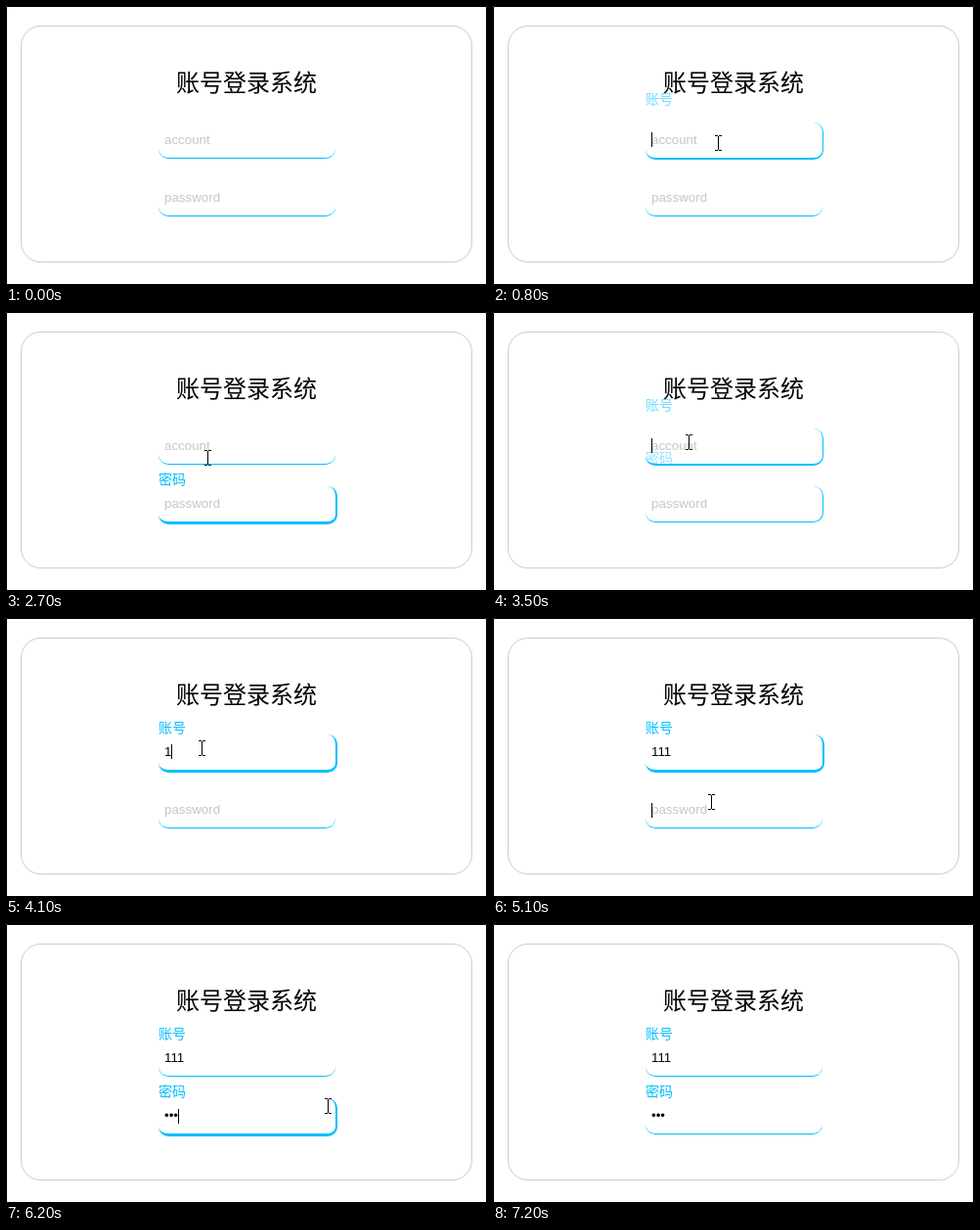
Recreate the animation shown at these times as an HTML page. Size 492 px wide and 284 px high, loop 7.6 s.

```html
<!DOCTYPE html>
<html lang="zh">
<head>
<meta charset="utf-8">
<style>
  html, body { margin: 0; width: 100%; height: 100%; overflow: hidden; background: #fff; }
  #stage { position: relative; width: 492px; height: 284px; overflow: hidden; }
  .field {
    position: absolute; left: 156px; width: 181px; height: 36px;
    border: 0 solid #00bfff; border-radius: 10px;
  }
  svg { position: absolute; left: 0; top: 0; }
  .cjk { font-family: "Noto Sans CJK SC", "Noto Sans CJK", sans-serif; }
  .title { font-size: 24px; }
  .label { font-size: 14px; fill: #00bfff; }
  .input { font: 13.333px "Liberation Sans", Arial, sans-serif; }
  .hint { fill: #c6c6c6; }
</style>
</head>
<body>
<div id="stage">
  <svg id="art" width="492" height="284" viewBox="0 0 492 284">
    <path d="M.5 284V.5H491.5V284" fill="none" stroke="#000"/>
    <rect x="15.5" y="20.5" width="461" height="241" rx="20" fill="none" stroke="#ccc"/>
    <text class="cjk title" x="246" y="87" text-anchor="middle">账号登录系统</text>
    <g id="fields"></g>
    <rect id="caret" width="1" height="15"/>
    <g id="cursor">
      <path id="beam" d="M-3-7.5H0M1-7.5H4M.5-7V7M-3 7.5H0M1 7.5H4" fill="none" stroke="#000"/>
      <path id="arrow" d="M.5.5V16.5L4.3 13 7 19 9.3 18 6.7 12H11.5Z" fill="#fff" stroke="#000"/>
    </g>
  </svg>
</div>
<script>
const LOOP = 7600, STEP = 100, FADE = 290, BLINK = 480, SLIDE = 39;
const $ = id => document.getElementById(id);

// focus: spans with focus; open: spans with the label shown; keys: typing times
const fields = [
  { top: 119, label: '账号', hint: 'account', char: '1',
    focus: [[700, 2010], [3400, 5100]], open: [[700, 2010], [3400, LOOP]],
    keys: [4100, 4300, 4400] },
  { top: 178, label: '密码', hint: 'password', char: '•',
    focus: [[2010, 3400], [5100, 6910]], open: [[2010, 3400], [5100, LOOP]],
    keys: [5800, 6000, 6100] }
];

// mouse waypoints: time, x, y
const route = [
  [100, 381, 74], [500, 230, 140], [1200, 230, 140], [1700, 211, 195],
  [2600, 211, 195], [2700, 206, 149], [3000, 200, 133], [4400, 200, 133],
  [4900, 223, 188], [5900, 223, 188], [6200, 329, 186], [6300, 360, 185],
  [6400, 376, 187], [6700, 376, 187], [6800, 392, 186], [6900, 392, 186],
  [7000, 441, 140]
];

function addText(cls, x, y, str) {
  const el = document.createElementNS('http://www.w3.org/2000/svg', 'text');
  el.setAttribute('class', cls);
  el.setAttribute('x', x);
  el.setAttribute('y', y);
  el.textContent = str;
  return $('fields').appendChild(el);
}

for (const f of fields) {
  f.box = document.createElement('div');
  f.box.className = 'field';
  f.box.style.top = f.top + 'px';
  $('stage').insertBefore(f.box, $('art'));
  f.labelEl = addText('cjk label', 156, f.top - 2, f.label);
  f.textEl = addText('input', 162, f.top + 22, f.hint);
}

const ease = p => 1 - (1 - Math.min(1, Math.max(0, p))) ** 2;
const level = (spans, t) => spans.reduce(
  (sum, [a, b]) => sum + ease((t - a) / FADE) * (1 - ease((t - b) / FADE)), 0);
const show = (el, on) => el.setAttribute('visibility', on ? 'visible' : 'hidden');

function drawField(f, t) {
  const glow = level(f.focus, t), open = level(f.open, t);
  f.box.style.borderBottomWidth = 1 + 2 * glow + 'px';
  f.box.style.borderRightWidth = 2 * glow + 'px';
  f.labelEl.setAttribute('opacity', open);
  f.labelEl.setAttribute('transform', `translate(0 ${-SLIDE * (1 - open)})`);

  const typed = f.keys.filter(k => k <= t);
  f.textEl.textContent = typed.length ? f.char.repeat(typed.length) : f.hint;
  f.textEl.setAttribute('class', typed.length ? 'input' : 'input hint');

  const span = f.focus.find(([a, b]) => t >= a && t < b);
  if (!span) return;
  const since = Math.max(span[0], ...typed);
  const width = typed.length ? f.textEl.getComputedTextLength() : 0;
  $('caret').setAttribute('x', 162 + Math.round(width - 0.3));
  $('caret').setAttribute('y', f.top + (f.top > 150 ? 11 : 10));
  show($('caret'), Math.floor((t - since) / BLINK) % 2 === 0);
}

function drawCursor(t) {
  const i = route.findIndex(p => p[0] >= t);
  const visible = i >= 0 && t >= route[0][0];
  let x = 0, y = 0;
  if (visible) {
    const b = route[i], a = route[Math.max(0, i - 1)];
    const p = b === a ? 1 : (t - a[0]) / (b[0] - a[0]);
    x = Math.round(a[1] + (b[1] - a[1]) * p);
    y = Math.round(a[2] + (b[2] - a[2]) * p);
  }
  const over = x >= 156 && x < 337 && fields.some(f => y >= f.top && y < f.top + 37);
  $('cursor').setAttribute('transform', `translate(${x} ${y})`);
  show($('beam'), visible && over);
  show($('arrow'), visible && !over);
}

function draw(time) {
  const t = Math.floor(time % LOOP / STEP) * STEP;
  show($('caret'), false);
  fields.forEach(f => drawField(f, t));
  drawCursor(t);
}

const start = performance.now();
function tick() {
  draw(performance.now() - start);
  requestAnimationFrame(tick);
}
tick();
</script>
</body>
</html>
```
